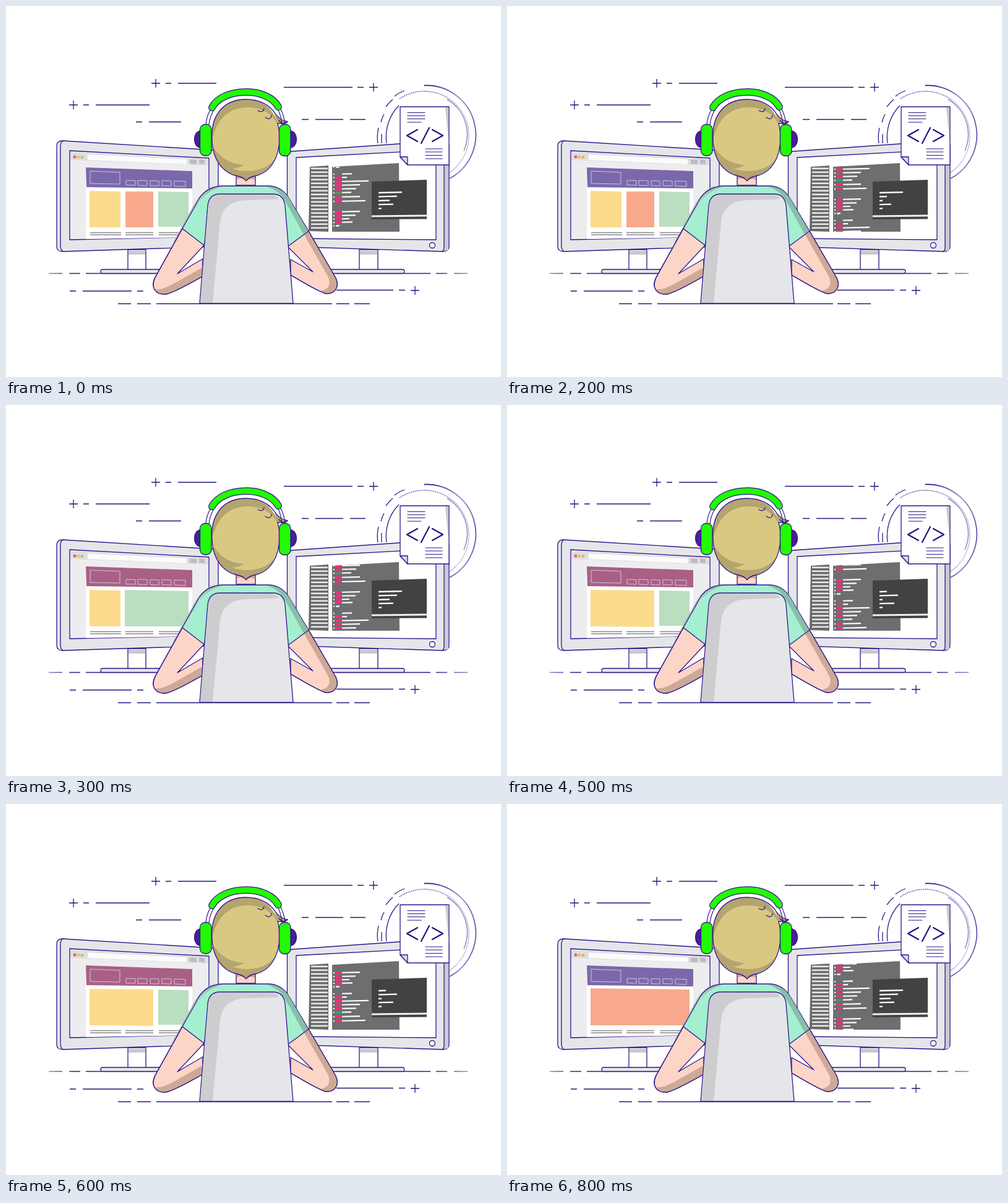
Animation of 800x600 px, one loop 0.9 s. Source, as an HTML page:

```html
<!DOCTYPE html>
<html lang="en">
<head>
<meta charset="utf-8">
<title>Programmer at work</title>
<style>
  html, body { margin: 0; width: 100%; height: 100%; overflow: hidden; background: #fff; }
  svg { display: block; width: 100vw; height: 100vh; }
  .ink { stroke: #31168c; stroke-width: 1.3; stroke-linejoin: round; stroke-linecap: round; }
  .line { fill: none; }
  .deco { fill: none; stroke: #22147c; stroke-width: 1.3; }
  .frame { fill: #e5e6e9; }
  .skin { fill: #fcd5c7; }
  .green { fill: #22fa05; }
  .yellow { fill: #fcdb8c; }
  .red { fill: #f8a98b; }
  .mint { fill: #b9dfc0; }

  /* The small lead keeps every change just ahead of its exact tenth of a second. */
  .banner, .code, .view, .term { animation: 900ms step-end -2ms infinite; }
  .banner { fill: #7b68ab; animation-name: banner; }
  .code { animation-name: scroll; animation-timing-function: steps(9, end); }
  .view, .term { opacity: 0; }
  .v1 { animation-name: view1; }
  .v2 { animation-name: view2; }
  .v3 { animation-name: view3; }
  .v4 { animation-name: view4; }
  .t1 { animation-name: term1; }
  .t2 { animation-name: term2; }
  .t3 { animation-name: term3; }

  @keyframes scroll { to { transform: translateY(-90px); } }
  @keyframes banner { 0%, 77.77% { fill: #7b68ab; } 33.33% { fill: #aa6085; } }
  @keyframes view1 { 0% { opacity: 1; } 33.33%, 100% { opacity: 0; } }
  @keyframes view2 { 0%, 55.55%, 100% { opacity: 0; } 33.33% { opacity: 1; } }
  @keyframes view3 { 0%, 77.77%, 100% { opacity: 0; } 55.55% { opacity: 1; } }
  @keyframes view4 { 0% { opacity: 0; } 77.77%, 100% { opacity: 1; } }
  @keyframes term1 { 0%, 33.33%, 88.88% { opacity: 1; } 11.11%, 55.55% { opacity: 0; } }
  @keyframes term2 { 0%, 33.33%, 100% { opacity: 0; } 11.11% { opacity: 1; } }
  @keyframes term3 { 0%, 88.88%, 100% { opacity: 0; } 55.55% { opacity: 1; } }
</style>
</head>
<body>
<svg viewBox="0 0 800 600">
  <defs>
    <clipPath id="editor"><path d="M527 260 635 254 636 365 527 365Z"/></clipPath>
    <clipPath id="head"><path d="M333 218C330 176 352 151 388 151C421 151 442 174 442 213C442 246 427 270 402 275Q392 277 388 283Q384 277 374 275C349 270 334 247 333 218Z"/></clipPath>
    <linearGradient id="fade" gradientUnits="userSpaceOnUse" x1="600" y1="0" x2="760" y2="0">
      <stop offset=".55" stop-color="#31168c"/><stop offset=".85" stop-color="#9285c4"/><stop offset="1" stop-color="#6a55b2"/>
    </linearGradient>
    <linearGradient id="desk" gradientUnits="userSpaceOnUse" x1="69" y1="0" x2="746" y2="0">
      <stop stop-color="#9285c4"/><stop offset=".06" stop-color="#31168c"/>
      <stop offset=".92" stop-color="#31168c"/><stop offset="1" stop-color="#9285c4"/>
    </linearGradient>
  </defs>

  <path class="deco" d="M235 125h14m-7-7v14M258 125h9M278 125h62M102 160h14m-7-7v14M125 160h9M145 160h87M210 187.500h10M231 187.500h52
    M449 131.500h111M568 131.500h10M587 131.500h14m-7-7v14M478 183.500h11M500 183.500h45M556 183.500h25
    M103 461h10M124 461h79M212 461h10M534 459.500h92M635 459.500h10M654 460h14m-7-7v14
    M181 481.500h21M212 481.500h22M243 481.500h284M534 481.500h21M563 481.500h25"/>
  <path d="M69 432.500h22M102 432.500h18M129 432.600h112M534 432.500h152M695 432.600h18M724 432.500h22" fill="none" stroke="url(#desk)" stroke-width="1.500"/>

  <!-- Orbit rings behind the document -->
  <g fill="none" stroke="url(#fade)" stroke-width="1.300">
    <path d="M676 128.500A80 80 0 0 1 717 279" stroke-width="1.800"/>
    <path d="M713 151A66 66 0 0 1 740 234"/>
    <path d="M636 150A72 72 0 0 1 716 270" stroke-dasharray="1.500 1.500"/>
    <path d="M601 222Q599 210 602 197M606 188Q608 180 611 175M614 163Q619 156 625 151M628 146Q635 140 644 137M615 222C612 200 619 177 635 161M607 222V207"/>
  </g>

  <!-- Left monitor -->
  <g class="ink">
    <path d="M197 394h29v33h-29z" fill="#fff"/>
    <path d="M198 396h27v6h-27z" fill="#c9c9cc" stroke="none"/>
    <rect class="frame" x="153" y="426" width="100" height="6.500" rx="3.200"/>
    <path class="frame" d="M82 226Q82 218 92 218L335 233Q343 234 343 241V389L92 397Q82 397 82 389Z"/>
    <path class="line" d="M92 218Q88 220 88 227V388Q88 394 92 397"/>
    <path d="M103 234 328 246V373L103 378Z" fill="#ededf0"/>
  </g>
  <path d="M104 236 327 247V258L104 249Z" fill="#dedfe2"/>
  <path d="M132 240 292 248V256L132 249Z" fill="#fbfbfc"/>
  <path d="M297 248 308 249V256L297 255ZM312 248 321 249V256L312 255Z" fill="#bcbcc0"/>
  <circle cx="111" cy="244" r="2.500" fill="#ee5d73"/>
  <circle cx="117" cy="244.300" r="2.500" fill="#f3bd64"/>
  <circle cx="123" cy="244.600" r="2.500" fill="#d5bc68"/>
  <path d="M129 261 301 267V374L129 377Z" fill="#fff"/>
  <path class="banner" d="M129 261 301 267V295L130 293Z"/>
  <path d="M136 267 184 269V288L136 287ZM194 282 209 282.500V290L194 289.500ZM213 282 228 282.500V290.500L213 290ZM233 282.500 247 283V291L233 290.500ZM252 282.500 267 283V291L252 290.500ZM272 283 290 283.500V292L272 291Z" fill="none" stroke="#cfc5df" stroke-width="1"/>
  <g class="view v1">
    <path class="yellow" d="M135 299 185 300V358H135Z"/>
    <path class="red" d="M193 300H238V358H193Z"/>
    <path class="mint" d="M246 300 295 301V357H246Z"/>
  </g>
  <g class="view v2">
    <path class="yellow" d="M135 299 185 300V358H135Z"/>
    <path class="mint" d="M192 299 295 301V358H192Z"/>
  </g>
  <g class="view v3">
    <path class="yellow" d="M135 299 238 300V359L135 358Z"/>
    <path class="mint" d="M246 300 295 301V357H246Z"/>
  </g>
  <path class="view v4 red" d="M135 298 295 300V358H135Z"/>
  <path d="M136 366.500h50M136 370h50M193 366.500h45M193 370h45M247 366.500h40M247 370h36" stroke="#898989" stroke-width="1.400"/>

  <!-- Right monitor -->
  <g class="ink">
    <path d="M571 394h30v33h-30z" fill="#fff"/>
    <path d="M572 396h28v6h-28z" fill="#c9c9cc" stroke="none"/>
    <rect class="frame" x="520" y="426" width="124" height="6.500" rx="3.200"/>
    <path class="frame" d="M454.500 244Q454.500 236 463 235L706 218Q716 218 716 226V389Q716 397 706 397L454.500 389Z"/>
    <path d="M709 222H715V395L707 396Z" fill="#cacacf" stroke="none"/>
    <path class="line" d="M708 219V390Q708 395 705 397"/>
    <path d="M469 245 695 233V378L469 376Z" fill="#fff"/>
    <circle cx="689" cy="387" r="4.500" fill="#fff"/>
  </g>
  <path d="M491 260 521 258V365L489 364Z" fill="#69696b"/>
  <g id="sidebar"></g>
  <path d="M527 260 635 254 636 365 527 365Z" fill="#6d6e70"/>
  <g clip-path="url(#editor)"><g id="code" class="code"></g></g>
  <path d="M591 284 680 281V344.500L591 345Z" fill="#424243"/>
  <path d="M591 338.500 680 337.500V340.500L591 341.500Z" fill="#eee"/>
  <g id="terminal" fill="none" stroke="#fff" stroke-width="2.300"></g>

  <!-- Document -->
  <g class="ink">
    <path d="M637 163H716V257H649L637 244Z" fill="#fff"/>
    <path d="M710 164H715V218Z" fill="#c9c9cd" stroke="none"/>
    <path d="M637 244H649V257Z" fill="#d9d7e3"/>
    <path class="line" d="M649 172.500h28M649 177.500h28M649 182.500h28M649 188h22M678 231h27M678 236h27M678 241.500h27M678 247h27" stroke-width="1.200"/>
    <path class="line" d="M665 200 648 209.500 665 219M684 197 671 222M689 200 706 209.500 689 219" stroke="#22147c" stroke-width="2.200"/>
  </g>

  <!-- Arms, shirt and neck -->
  <path d="M337 291Q318 296 303 322L270 383 283 372 318 305Z" fill="#b5b4ba" opacity=".8"/>
  <g class="ink">
    <path class="skin" d="M285 360 241 439C233 456 242 467 258 466Q269 465 318 437V409L277 433 321 386Z"/>
    <path d="M241 458Q252 460 273 448L319 422V436L270 462Q247 471 241 458Z" fill="#cda996" stroke="none"/>
    <path class="skin" d="M489 364 533 440C540 456 530 466 517 465Q507 463 460 435V410L496 430 454 388Z"/>
    <path d="M489 365 533 440C540 456 530 466 517 465Q511 464 505 461C524 460 525 447 520 437L482 370Z" fill="#cda996" stroke="none"/>
    <path class="line" d="M489 364 533 440C540 456 530 466 517 465Q507 463 460 435M285 360 241 439C233 456 242 467 258 466Q269 465 318 437"/>
    <path d="M285 360 313 310Q327 291 352 291H425Q446 292 458 312L489 364 454 390 440 330H335L320 387Z" fill="#a3efd0"/>
    <path d="M421 292Q446 292 458 312L488 364 481 369 452 317Q442 298 421 292Z" fill="#88bfa9" stroke="none"/>
    <path d="M350 292Q329 292 314 312L300 336Q315 301 350 292Z" fill="#9fbcb2" stroke="none"/>
    <path class="skin" d="M372 268V290H403V268"/>
    <path d="M373 274H402V281Q392 278 388 283Q384 277 373 280Z" fill="#d1a995" stroke="none"/>
  </g>

  <!-- Chair -->
  <path class="ink frame" d="M313 481 326 323Q328 304 346 304H431Q449 304 451 323L464 481Z"/>
  <path d="M314 480 327 323Q329 305 346 305H430Q437 305 441 312Q432 313 389 314Q350 315 346 349L334 480Z" fill="#cdcdcf"/>

  <!-- Head -->
  <g clip-path="url(#head)">
    <path d="M325 145H450V290H325Z" fill="#b3a470"/>
    <path d="M332 223C338 185 359 163 392 164C421 165 440 181 443 208V238Q426 262 402 266Q382 269 366 263Q378 262 384 257Q349 255 332 223Z" fill="#d8c882"/>
  </g>
  <g class="ink">
    <path d="M433 171Q443 185 455 187Q450 191 439 190Z" fill="#b3a470" stroke="none"/>
    <path class="line" d="M333 218C330 176 352 151 388 151C410 151 426 160 436 175Q443 185 455 187Q450 191 439 190M439 190Q442 200 442 213C442 246 427 270 402 275Q392 277 388 283Q384 277 374 275C349 270 334 247 333 218"/>
    <path class="line" d="M407 169Q415 174 417 166M419 180Q428 186 429 177M441 185Q449 194 455 187"/>
  </g>

  <!-- Headphones -->
  <g class="ink">
    <path class="line" d="M331 167Q324 178 323 192M336 168Q329 180 328 192M439 166Q445 178 446 192M443 165Q450 178 451 192" stroke-width="1.200"/>
    <path class="line" d="M333 164C351 131 423 131 440 163" stroke-width="12"/>
    <path class="line" d="M333 164C351 131 423 131 440 163" stroke="#22fa05" stroke-width="9.500"/>
    <path d="M315 202C301 202 301 229 315 229ZM459 202C473 202 473 229 459 229Z" fill="#4b1d9b"/>
    <rect class="green" x="313.500" y="191.500" width="18.500" height="50.500" rx="8"/>
    <rect class="green" x="441.500" y="191.500" width="18.500" height="51" rx="8"/>
  </g>
</svg>
<script>
  const NS = 'http://www.w3.org/2000/svg';
  const add = (parent, tag, attrs) => {
    const node = document.createElementNS(NS, tag);
    for (const key in attrs) node.setAttribute(key, attrs[key]);
    return parent.appendChild(node);
  };
  const byId = id => document.getElementById(id);
  const bar = (parent, x, y, width, height, fill) => add(parent, 'rect', { x, y, width, height, fill });

  for (let y = 261.5; y < 362; y += 6) bar(byId('sidebar'), 493, y, 27, 2.6, '#e8e8e8');

  // Each code row: vertical offset, right end, marker colour.
  const pink = '#e83079', white = '#fff', green = '#3da75c';
  const rows = [
    [0, 572, pink], [6, 565, pink], [11.5, 555, pink], [17, 560, pink], [22.5, 0, white],
    [34, 559], [39.5, 551, pink], [46, 586, pink], [52, 572, pink], [58, 566, pink],
    [64, 558, green], [71, 572, pink], [78, 581, pink]
  ];
  const period = 95;
  const code = byId('code');
  for (let block = 0; block < 3; block++) {
    for (const [offset, end, marker] of rows) {
      const y = 333 + (block - 1) * period + offset;
      const row = add(code, 'g', { transform: `translate(527 ${y}) skewY(-1.2)` });
      bar(row, 2, -1, 2, 2.2, white);
      if (marker) {
        const height = marker === pink ? 4 : 2.2;
        bar(row, 6, -height / 2 + .2, end ? 9 : 6, height, marker);
      }
      if (end) bar(row, 16, -1, end - 543, 2.2, white);
    }
  }

  const terminalStates = [[38, 30, 18, 24, 5], [38, 12, 5, 19, 5], [12, 30, 5, 24, 5]];
  terminalStates.forEach((widths, i) => {
    const d = widths.map((w, n) => `M602 ${302 + n * 6.4}l${w} ${-w * .025}`).join('');
    add(byId('terminal'), 'path', { class: `term t${i + 1}`, d });
  });
</script>
</body>
</html>
```
